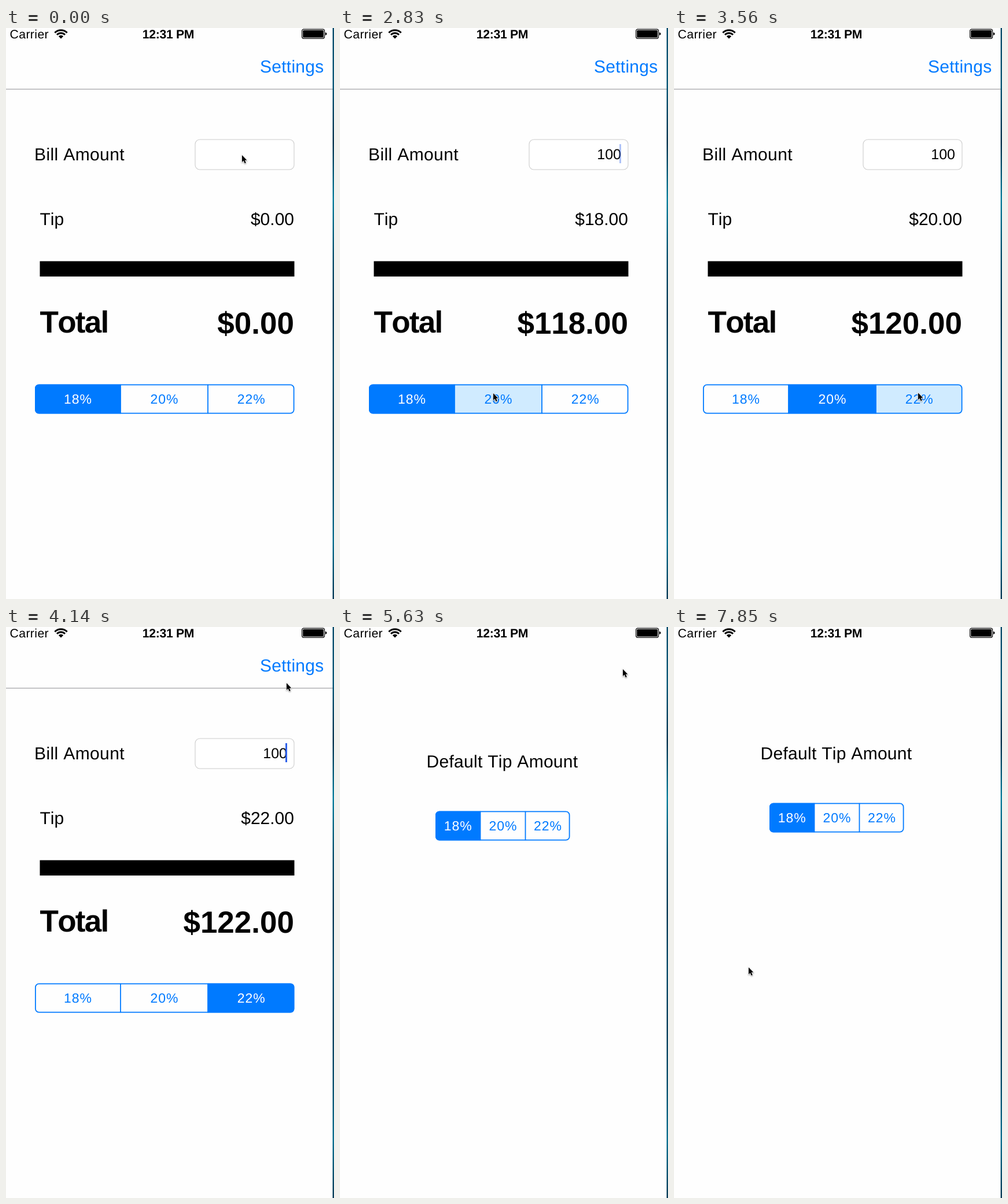
An HTML page that plays this animation: 567x988 px, repeating every 8 s.

```html
<!DOCTYPE html>
<html lang="en">
<head>
<meta charset="utf-8">
<title>Tip calculator</title>
<style>
  html, body { margin: 0; width: 100%; height: 100%; overflow: hidden; background: #fefefe; }
  svg { display: block; }
  text {
    font: 30px "Liberation Sans", Arial, sans-serif;
    font-kerning: none;
    text-rendering: geometricPrecision;
    white-space: pre;
  }
</style>
</head>
<body>
<svg id="stage" width="567" height="988" viewBox="0 0 567 988"></svg>
<script>
const LOOP = 8000, TICK = LOOP / 54;
const BLUE = '#007aff', PAPER = '#fefefe';
const stage = document.getElementById('stage');

// Cursor tip: time, x, y
const path = [
  [1340, 408, 220], [1780, 372, 390], [2370, 277, 689], [2519, 268, 694],
  [2667, 265, 635], [2815, 265, 632], [2963, 280, 632], [3111, 367, 629],
  [3260, 418, 632], [3704, 424, 631], [4148, 485, 97], [4296, 489, 73],
  [5640, 489, 73], [6222, 246, 290], [6667, 217, 326], [7570, 217, 326],
  [7852, 129, 589]
];

function cursorAt(t) {
  const i = path.findIndex(p => p[0] > t);
  if (i === 0) return path[0].slice(1);
  if (i < 0) return path[path.length - 1].slice(1);
  const [a, x0, y0] = path[i - 1], [b, x1, y1] = path[i];
  const k = (t - a) / (b - a);
  return [x0 + (x1 - x0) * k, y0 + (y1 - y0) * k];
}

function label(s, x, y, { size = 30, anchor = 'start', fill = '#000', weight = 400, gap = 0, opacity = 1 } = {}) {
  return `<text x="${x}" y="${y}" text-anchor="${anchor}" fill="${fill}" opacity="${opacity}"
    style="font-size:${size}px;font-weight:${weight};letter-spacing:${gap}px">${s}</text>`;
}

function rect(x, y, w, h, attrs) {
  return `<rect x="${x}" y="${y}" width="${w}" height="${h}" ${attrs}/>`;
}

function segments(id, edges, y, selected, pressed = -1) {
  const left = edges[0], width = edges[3] - left;
  let fills = '', lines = '', labels = '';
  ['18%', '20%', '22%'].forEach((s, i) => {
    const x = edges[i], w = edges[i + 1] - x;
    const fill = i === selected ? BLUE : i === pressed ? '#d0ebff' : PAPER;
    fills += rect(x, y, w, 51, `fill="${fill}"`);
    if (i) lines += rect(x - .9, y, 1.8, 51, `fill="${BLUE}"`);
    labels += label(s, x + w / 2 + .5, y + 33.5,
      { size: 23, anchor: 'middle', gap: 1, fill: i === selected ? '#fff' : BLUE });
  });
  return `<clipPath id="${id}">${rect(left, y, width, 51, 'rx="7"')}</clipPath>
    <g clip-path="url(#${id})">${fills}${lines}</g>
    ${rect(left + .9, y + .9, width - 1.8, 49.2, `rx="6" fill="none" stroke="${BLUE}" stroke-width="1.8"`)}
    ${labels}`;
}

function caretAlpha(t) {
  if (t < 1000) return t < 75 ? 0 : 1;
  const wave = Math.sin((t - 1340) / 1000 * 2 * Math.PI);
  return Math.min(1, Math.max(0, .5 - .7 * wave));
}

function calculator(t) {
  const bill = t < 585 ? '' : t < 735 ? '10' : '100';
  const choice = t < 2900 ? 0 : t < 3640 ? 1 : 2;
  const pressed = t > 2740 && t < 2900 ? 1 : t > 3480 && t < 3640 ? 2 : -1;
  const tip = bill * (18 + 2 * choice) / 100;
  const money = n => '$' + n.toFixed(2);
  const end = { anchor: 'end' };
  return label('Settings', 549.5, 77, { ...end, fill: BLUE, gap: .25, opacity: t > 5180 ? .3 : 1 }) +
    rect(0, 105, 565, 1.6, 'fill="#b7b7b9"') +
    label('Bill Amount', 49, 229, { gap: .38 }) +
    rect(327, 193, 171, 52, 'rx="8" fill="#fff" stroke="#ccc" stroke-width="1.1"') +
    label(bill, 486, 227, { ...end, size: 25 }) +
    rect(483, 201, 3, 33, `fill="#2f62ea" opacity="${caretAlpha(t)}"`) +
    label('Tip', 58.5, 341) +
    label(money(tip), 498, 341, end) +
    rect(58.5, 403.5, 440, 26.5, '') +
    label('Total', 58.5, 527, { size: 53, weight: 700, gap: -1.7 }) +
    label(money(+bill + tip), 498, 528.5, { ...end, size: 53, weight: 700 }) +
    segments('main', [50, 198, 349, 498.5], 616.5, choice, pressed);
}

// Settings sheet rises on a critically damped spring
function sheet(t) {
  const s = (t - 5310) / 1000 * 19.5;
  if (s < 0) return '';
  const y = 988 * (1 + s) * Math.exp(-s);
  return `<g transform="translate(0 ${y.toFixed(2)})">
    ${rect(0, 0, 565, 988, `fill="${PAPER}"`)}
    ${label('Default Tip Amount', 280.5, 229, { anchor: 'middle', gap: .28 })}
    ${segments('default', [165, 242.5, 320.5, 397.5], 304.5, 0)}
  </g>`;
}

function statusBar() {
  const arc = r => {
    const d = r * .72;
    return `<path d="M${95 - d} ${18.5 - r * .69}A${r} ${r} 0 0 1 ${95 + d} ${18.5 - r * .69}"
      fill="none" stroke="#000" stroke-width="2.8"/>`;
  };
  return label('Carrier', 6.5, 18, { size: 21.2, gap: .4 }) +
    arc(14.8) + arc(9.8) + '<path d="M95 18.5L90.8 14.3A6 6 0 0 1 99.2 14.3Z"/>' +
    label('12:31 PM', 280.5, 18, { size: 21.2, weight: 700, anchor: 'middle', gap: -.3 }) +
    rect(511.6, 2.1, 39, 16, 'rx="3" fill="none" stroke="#000" stroke-width="1.2"') +
    rect(513.2, 3.7, 35.8, 12.8, 'rx="1.5"') +
    '<path d="M552 7.5Q554.6 8 554.6 10.1T552 12.8Z"/>';
}

function desktopEdge() {
  const stops = ['#0a4c6b', '#0b5878', '#0a3550', '#0b7f9e', '#08506e', '#083a56',
    '#0a4c6b', '#0a3f5c', '#08506e', '#0b6f90', '#083a56'];
  return `<linearGradient id="edge" x2="0" y2="1">${stops.map((c, i) =>
    `<stop offset="${i / 10}" stop-color="${c}"/>`).join('')}</linearGradient>` +
    rect(564.6, 0, 2.4, 988, 'fill="url(#edge)"');
}

function cursor(t) {
  const [x, y] = cursorAt(t);
  return `<path transform="translate(${x.toFixed(1)} ${y.toFixed(1)})"
    d="M0 0V12L2.7 9.5L4.7 14.2L6.8 13.3L4.8 8.7H8.4Z"
    stroke="#fff" stroke-width="1.4" paint-order="stroke" style="filter:drop-shadow(0 1px .8px #0006)"/>`;
}

let shown = -1;
function frame(now) {
  const tick = Math.floor((now + 9) % LOOP / TICK);
  if (tick !== shown) {
    shown = tick;
    const t = tick * TICK;
    stage.innerHTML = rect(0, 0, 567, 988, `fill="${PAPER}"`) +
      calculator(t) + sheet(t) + statusBar() + desktopEdge() + cursor(t);
  }
  requestAnimationFrame(frame);
}
frame(0);
</script>
</body>
</html>
```
